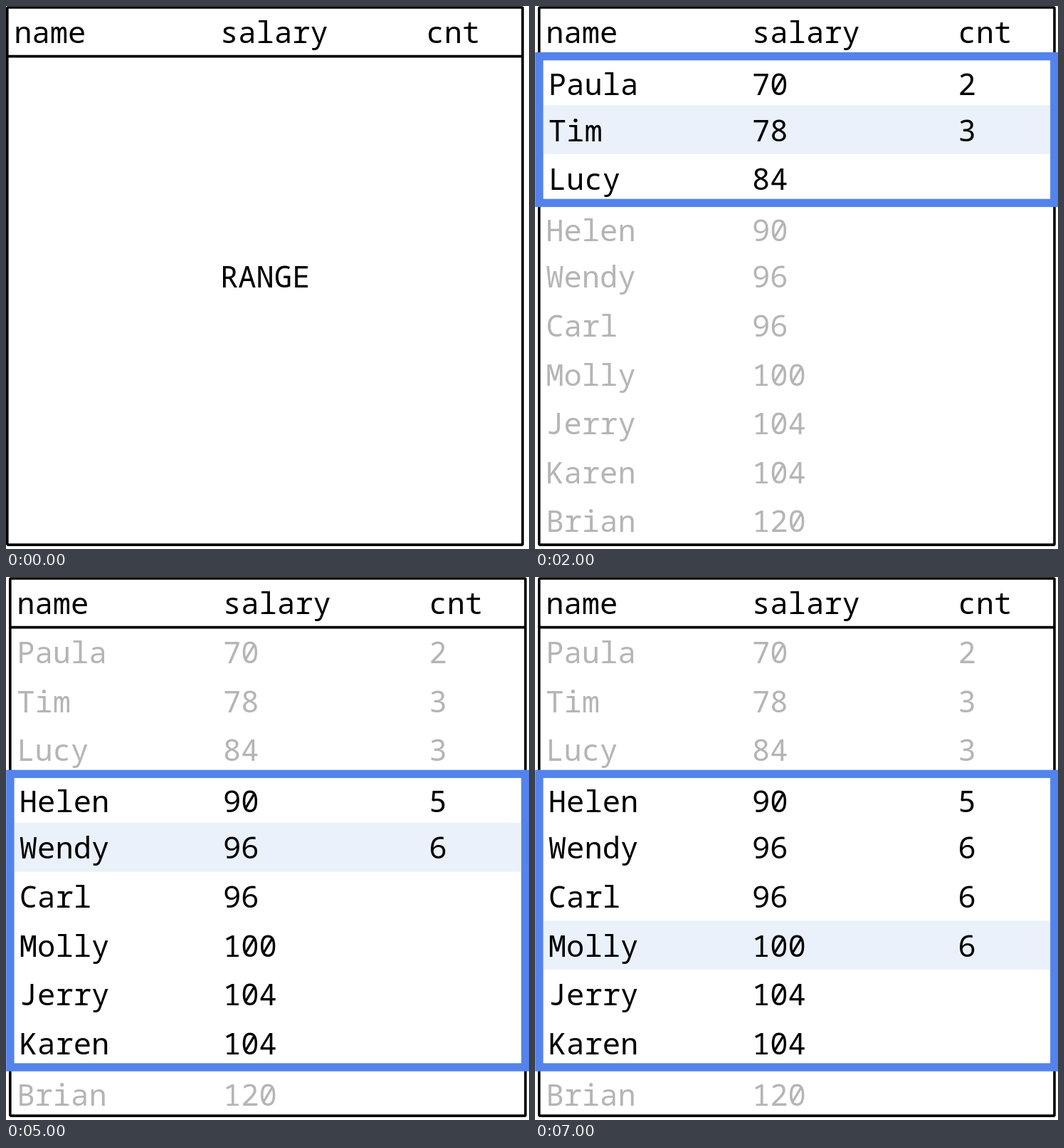
An HTML page for the animation above (8 s loop, 735 px wide and 762 px high).

```html
<!DOCTYPE html>
<html lang="en">
<head>
<meta charset="utf-8">
<title>Sliding range frame</title>
<style>
html, body { margin: 0; width: 100%; height: 100%; overflow: hidden; background: #fff; }
svg { display: block; width: 735px; height: 762px; }
text { font: 500 42.2px "Noto Sans Mono", "DejaVu Sans Mono", monospace; white-space: pre; }
</style>
</head>
<body>
<svg id="stage" viewBox="0 0 735 762"></svg>
<script>
const NS = "http://www.w3.org/2000/svg";
const stage = document.getElementById("stage");
const ROW = 68.6, TOP = 70.6;
const COLS = [15.2, 305, 594.5];
const BLACK = "#000", GREY = "#b5b5b5", BLUE = "#5383ec", PALE = "#eaf1fb";

const rows = [
  ["Paula", 70, 2], ["Tim", 78, 3], ["Lucy", 84, 3], ["Helen", 90, 5],
  ["Wendy", 96, 6], ["Carl", 96, 6], ["Molly", 100, 6], ["Jerry", 104],
  ["Karen", 104], ["Brian", 120]
];

// Each step: first row in the range, row after it, current row
const steps = [
  null, [0, 2, 0], [0, 3, 1], [1, 4, 2],
  [2, 7, 3], [3, 9, 4], [3, 9, 5], [3, 9, 6]
];

function add(parent, tag, attrs, label) {
  const el = document.createElementNS(NS, tag);
  for (const key in attrs) el.setAttribute(key, attrs[key]);
  if (label !== undefined) el.textContent = label;
  parent.appendChild(el);
  return el;
}

const edge = i => TOP + ROW * i;

function drawTable(g) {
  const line = { fill: "none", stroke: BLACK, "stroke-width": 3.6 };
  add(g, "rect", { x: 5.8, y: 2, width: 724.2, height: 754.1, rx: 1, ...line });
  add(g, "path", { d: `M5.8 ${TOP}H730`, ...line });
  ["name", "salary", "cnt"].forEach((s, i) => add(g, "text", { x: COLS[i], y: 52 }, s));
}

function drawRange(g, [first, end, current]) {
  const top = edge(first), height = edge(end) - top;
  add(g, "rect", { x: 12, y: edge(current), width: 712, height: ROW, fill: PALE });
  add(g, "rect", {
    x: 5.9, y: top, width: 723.9, height,
    fill: "none", stroke: BLUE, "stroke-width": 11.4
  });
  rows.forEach(([name, salary, cnt], i) => {
    const inside = i >= first && i < end;
    const y = 121 + ROW * i + (i === first || i === end ? 3.6 : 0);
    const fill = inside ? BLACK : GREY;
    add(g, "text", { x: COLS[0] + (inside ? 3.6 : 0), y, fill }, name);
    add(g, "text", { x: COLS[1], y, fill }, salary);
    if (i <= current) add(g, "text", { x: COLS[2], y, fill }, cnt);
  });
}

let shown = -1;

function render(ms) {
  const n = Math.floor(ms / 1000) % steps.length;
  if (n === shown) return;
  shown = n;
  stage.replaceChildren();
  const g = add(stage, "g", { transform: `translate(${steps[n] ? 0 : -4} 0)` });
  drawTable(g);
  if (steps[n]) drawRange(g, steps[n]);
  else add(g, "text", { x: COLS[1], y: 395.4 }, "RANGE");
}

const start = performance.now();
function tick() {
  render(performance.now() - start);
  requestAnimationFrame(tick);
}
tick();
</script>
</body>
</html>
```
